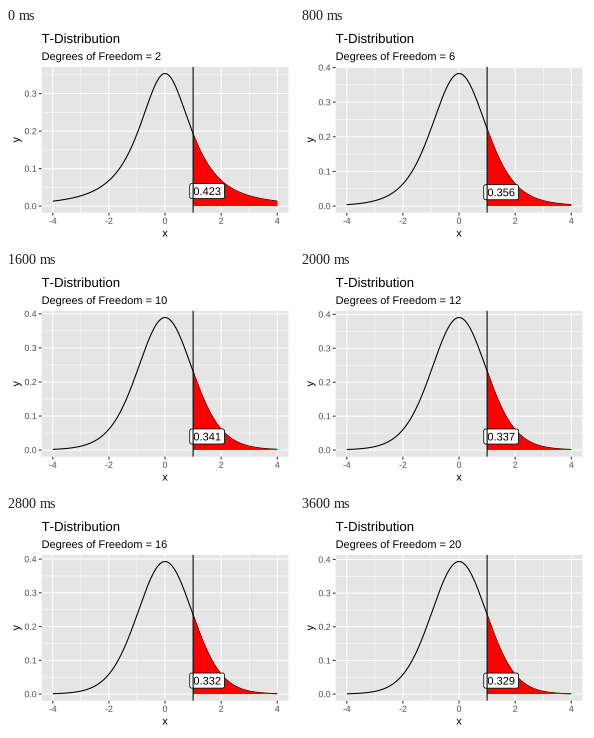
Write a matplotlib script that moves like this. It is 288 px wide and 216 px high and loops after 4000 ms.

```python
import math

import matplotlib.pyplot as plt
import numpy as np
from matplotlib.animation import FuncAnimation
from matplotlib.patches import FancyBboxPatch, PathPatch, Polygon, Rectangle
from matplotlib.textpath import TextPath
from matplotlib.transforms import Affine2D

plt.rcParams.update({
    "font.family": "Liberation Sans",
    "text.kerning_factor": 6,
    "path.snap": False,
})

W, H, DPI = 288, 216, 72
LEFT, RIGHT, TOP, BOTTOM = 35.6, 282.5, 38.9, 184.7
CUT = 1
THICK, THIN = 1.07, 0.53

fig = plt.figure(figsize=(W / DPI, H / DPI), dpi=DPI, facecolor="white")
ax = fig.add_axes([0, 0, 1, 1])


def density(x, df):
    c = math.gamma((df + 1) / 2) / (math.sqrt(df * math.pi) * math.gamma(df / 2))
    return c * (1 + x * x / df) ** (-(df + 1) / 2)


def p_value(t, df, n=2000):
    mid = (np.arange(n) + 0.5) * t / n
    return 1 - 2 * density(mid, df).sum() * t / n


def px(x):
    return (LEFT + RIGHT) / 2 + x * (RIGHT - LEFT) / 8.8


def line(xs, ys, color, width, z):
    ax.plot(xs, ys, color=color, lw=width, zorder=z,
            solid_capstyle="butt", solid_joinstyle="round")


def text(x, y, s, size, color="black", align="left", angle=0):
    """Draw text as outlines, so that it can sit between pixels."""
    glyphs = TextPath((0, 0), s, size=size)
    box = glyphs.get_extents()
    anchor = {"left": 0, "center": (box.x0 + box.x1) / 2, "right": box.x1}[align]
    place = Affine2D().translate(-anchor, 0).rotate_deg(angle).scale(1, -1).translate(x, y)
    ax.add_patch(PathPatch(place.transform_path(glyphs), fc=color, lw=0, zorder=8))


def draw(i):
    df = 2 * (i + 1)
    peak = density(0, df)
    zero = BOTTOM - (BOTTOM - TOP) * 0.05 / 1.1

    def py(y):
        return zero - y / peak * (BOTTOM - TOP) / 1.1

    ax.clear()
    ax.set(xlim=(0, W), ylim=(H, 0))
    ax.axis("off")
    ax.add_patch(Rectangle((LEFT, TOP), RIGHT - LEFT, BOTTOM - TOP,
                           fc="#e5e5e5", lw=0, zorder=0))

    # Grid, ticks and tick labels
    for x in range(-4, 5):
        major = x % 2 == 0
        line([px(x)] * 2, [TOP, BOTTOM], "white", THICK if major else THIN, 1 + major)
        if major:
            line([px(x)] * 2, [BOTTOM, BOTTOM + 2.75], "#333333", THICK, 2)
            text(px(x), 195.8, f"{x}", 8.8, "#4d4d4d", "center")
    for k in range(int(peak * 1.05 / 0.05) + 1):
        y, major = py(k * 0.05), k % 2 == 0
        line([LEFT, RIGHT], [y] * 2, "white", THICK if major else THIN, 1 + major)
        if major:
            line([LEFT - 2.75, LEFT], [y] * 2, "#333333", THICK, 2)
            text(LEFT - 5.3, y + 3.1, f"{k * 0.05:.1f}", 8.8, "#4d4d4d", "right")

    # Curve with the tail laid over its lower half
    xs = np.linspace(-4, 4, 401)
    line(px(xs), py(density(xs, df)), "black", THICK, 3)
    tail = np.linspace(CUT, 4, 151)
    edge = np.column_stack([px(tail), py(density(tail, df))])
    area = np.vstack([edge, [(px(4), zero), (px(CUT), zero)]])
    ax.add_patch(Polygon(area, fc="#fe0000", lw=0, zorder=4))

    # Probability label, crossed by the cut line
    cx, cy, w, h = px(1.5), py(0.04), 34.8, 15.1
    ax.add_patch(FancyBboxPatch((cx - w / 2, cy - h / 2), w, h,
                                boxstyle="round,pad=0,rounding_size=2.16",
                                fc="white", ec="black", lw=0.8, zorder=6))
    text(cx, cy + 3.95, f"{p_value(CUT, df):.3f}", 11.04, align="center")
    line([px(CUT)] * 2, [TOP, BOTTOM], "black", THICK, 9)

    text(LEFT, 15, "T-Distribution", 13.2)
    text(LEFT, 32, f"Degrees of Freedom = {df}", 11)
    text(px(0), 208.6, "x", 11, align="center")
    text(13.4, (TOP + BOTTOM) / 2, "y", 11, align="center", angle=90)


anim = FuncAnimation(fig, draw, frames=10, init_func=lambda: None,
                     interval=400, repeat=True, repeat_delay=0)
plt.show()
```
